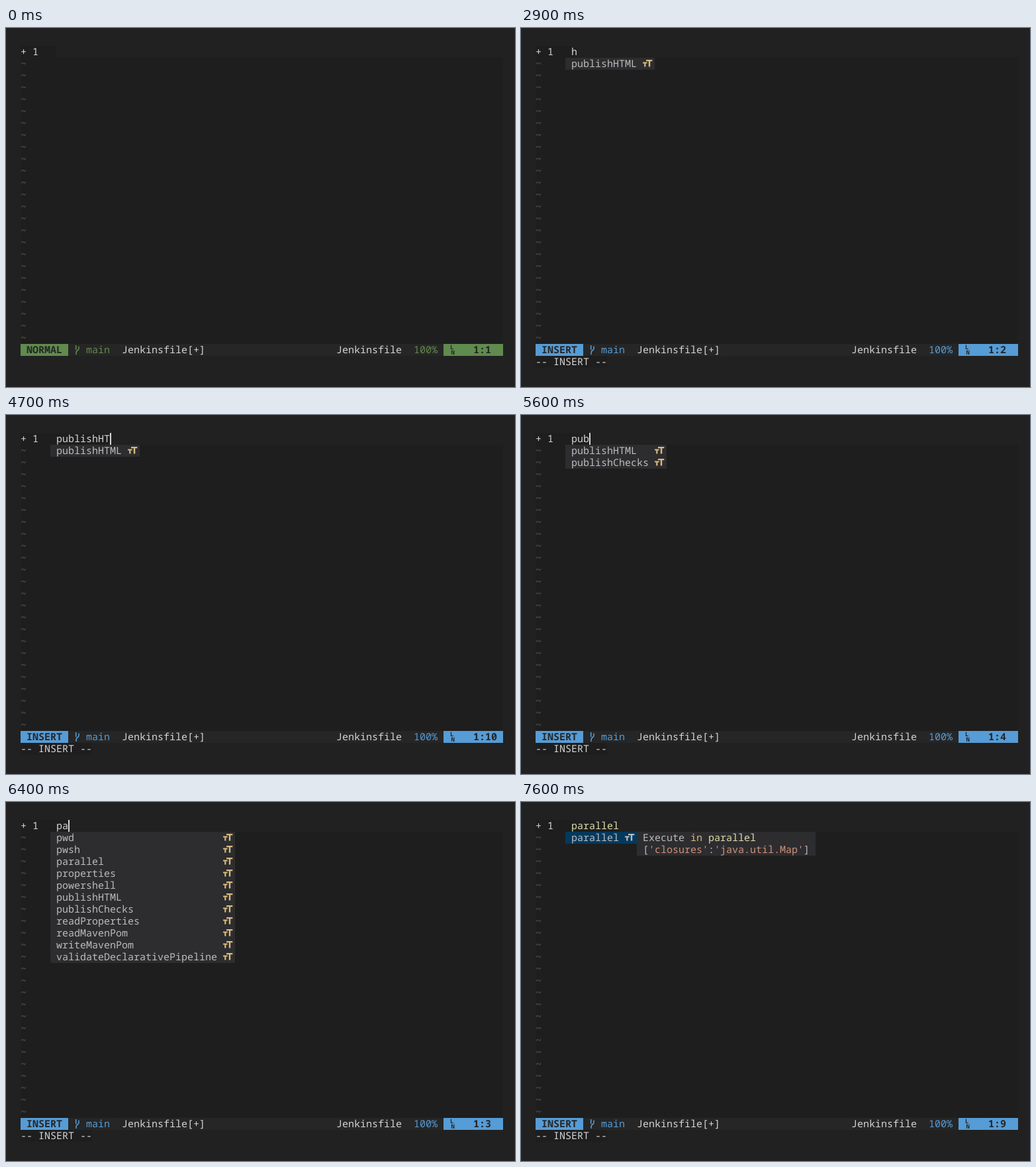
Write an HTML page that moves like this. It is 769 by 542 pixels and loops after 8000 ms.

```html
<!DOCTYPE html>
<html lang="en">
<head>
<meta charset="utf-8">
<title>Step completion</title>
<style>
  html, body { margin: 0; width: 100%; height: 100%; overflow: hidden; background: #212121; }
  svg { display: block; width: 100vw; height: 100vh; }
  text { font: 15px "Noto Sans Mono", monospace; white-space: pre; text-rendering: geometricPrecision; }
  .b { font-weight: 700; }
  .s { font-size: 9px; font-weight: 700; }
</style>
</head>
<body>
<svg id="stage" viewBox="0 0 769 542"></svg>
<script>
const LOOP = 8000, CW = 9, RH = 18, LEFT = 22, TOP = 27, CODE = 76;
const C = {
  edit: '#1e1e1e', bar: '#262626', text: '#d4d4d4', dim: '#5a5a5a', menu: '#2d2d30',
  item: '#bbbbbb', gold: '#d7ba7d', step: '#dcdcaa', str: '#ce9178', pick: '#04395e',
  NORMAL: '#608b4e', INSERT: '#569cd6'
};
const stage = document.getElementById('stage');

const ALL = ['pwd', 'pwsh', 'parallel', 'properties', 'powershell', 'publishHTML', 'publishChecks',
  'readProperties', 'readMavenPom', 'writeMavenPom', 'validateDeclarativePipeline'];
const HTML = ['publishHTML'], PUB = ['publishHTML', 'publishChecks'], PAR = ['parallel'];
const WORD = 'publishHTML';

// Each doc line is a list of [text, colour] runs
const signature = (name, type) => [["[", C.item], [`'${name}'`, C.str], [":", C.item], [`'${type}'`, C.str], ["]", C.item]];
const DOCS = {
  publishHTML: [[['Publish HTML reports', C.item]], signature('target', 'Map')],
  parallel: [[['Execute ', C.item], ['in', C.gold], [' ', C.item], ['parallel', C.step]],
    signature('closures', 'java.util.Map')]
};

// time, typed text, menu items, selected, doc shown
const STEPS = [
  [0, '', []],
  [2300, 'h', HTML],
  [3400, WORD, HTML, true],
  [3500, WORD, HTML, true, true],
  [4500, WORD.slice(0, 10), []],
  [4600, WORD.slice(0, 10), HTML],
  [4700, WORD.slice(0, 9), HTML],
  [4900, WORD.slice(0, 8), HTML],
  [5000, WORD.slice(0, 7), PUB],
  [5200, WORD.slice(0, 6), PUB],
  [5300, WORD.slice(0, 5), PUB],
  [5500, WORD.slice(0, 4), PUB],
  [5600, WORD.slice(0, 3), PUB],
  [5800, 'pu', PUB],
  [5900, 'p', PUB],
  [6000, 'p', ALL],
  [6100, '', ALL],
  [6200, 'p', []],
  [6400, 'pa', ALL],
  [6600, 'par', ALL],
  [6700, 'par', PAR],
  [6800, 'para', PAR],
  [7100, 'parallel', PAR, true, true]
];

const rect = (x, y, w, h, fill) => `<rect x="${x}" y="${y}" width="${w}" height="${h}" fill="${fill}"/>`;
const text = (x, y, str, fill, cls = '') =>
  `<text x="${x}" y="${y + 14}" fill="${fill}" class="${cls}" xml:space="preserve">${str}</text>`;
const runs = list => list.map(([str, fill]) => `<tspan fill="${fill}">${str}</tspan>`).join('');
const runLength = list => list.reduce((n, run) => n + run[0].length, 0);

function icon(x, y, fill) {
  return `<path transform="translate(${x} ${y})" fill="${fill}"
    d="M5 3H14.3V5.2H11.2V13.5H8.8V5.2H5ZM0 6.4H6.6V8.5H4.4V13.5H2.2V8.5H0Z"/>`;
}

function menu(items, selected, doc) {
  if (!items.length) return '';
  const x = CODE - CW, y = TOP + RH;
  const width = (Math.max(...items.map(s => s.length)) + 4) * CW;
  let out = rect(x, y, width, items.length * RH, selected ? C.pick : C.menu);
  items.forEach((name, i) => {
    const row = y + i * RH;
    out += text(CODE, row, name, C.item) + icon(x + width - 18, row, selected ? C.item : C.gold);
  });
  if (doc) {
    const lines = DOCS[items[0]], dx = x + width;
    const cells = Math.max(...lines.map(runLength)) + 2;
    out += rect(dx, y, cells * CW, lines.length * RH, C.menu);
    lines.forEach((line, i) => out += text(dx + CW, y + i * RH, runs(line), C.item));
  }
  return out;
}

function statusLine(mode, column) {
  const y = 477, hue = C[mode];
  return rect(94, y, 567, RH, C.bar) + rect(LEFT, y, 72, RH, hue) + rect(661, y, 90, RH, hue)
    + text(31, y, mode, C.bar, 'b')
    + `<path d="M105.7 479V486M110 480.5V484C110 487 106 486.5 106 490V493" fill="none" stroke="${hue}" stroke-width="1.6"/>`
    + text(121, y, 'main', hue) + text(175, y, 'Jenkinsfile[+]', C.text)
    + text(499, y, 'Jenkinsfile', C.text) + text(616, y, '100%', hue)
    + text(671, 471, 'L', C.bar, 's') + text(672.5, 479, 'N', C.bar, 's')
    + text(706, y, '1:' + column, C.bar, 'b');
}

function cursorOn(t) {
  if (t < 2200) return (t + 700) % 1000 < 500;
  return !(t >= 2900 && t < 3400 || t >= 4000 && t < 4500 || t >= 7600);
}

function scene(t) {
  const [, typed, items, selected, doc] = STEPS.findLast(s => s[0] <= t);
  const mode = t < 2200 ? 'NORMAL' : 'INSERT';
  const end = CODE + typed.length * CW;
  let out = rect(0, 0, 769, 542, '#212121')
    + rect(LEFT, TOP, end - LEFT, RH, C.edit) + rect(LEFT, TOP + RH, 729, 24 * RH, C.edit)
    + text(LEFT, TOP, '+ 1', C.text);
  for (let i = 1; i <= 24; i++) out += text(LEFT, TOP + i * RH, '~', C.dim);
  out += text(CODE, TOP, typed, doc ? C.step : C.text);
  if (cursorOn(t)) out += rect(end, TOP, mode === 'NORMAL' ? CW : 2, RH, C.text);
  out += menu(items, selected, doc) + statusLine(mode, typed.length + 1);
  if (mode === 'INSERT') out += rect(LEFT, 495, 108, RH, C.edit) + text(LEFT, 495, '-- INSERT --', C.text);
  return out;
}

let shown = '';
function frame() {
  const next = scene(performance.now() % LOOP);
  if (next !== shown) stage.innerHTML = shown = next;
  requestAnimationFrame(frame);
}
frame();
</script>
</body>
</html>
```
